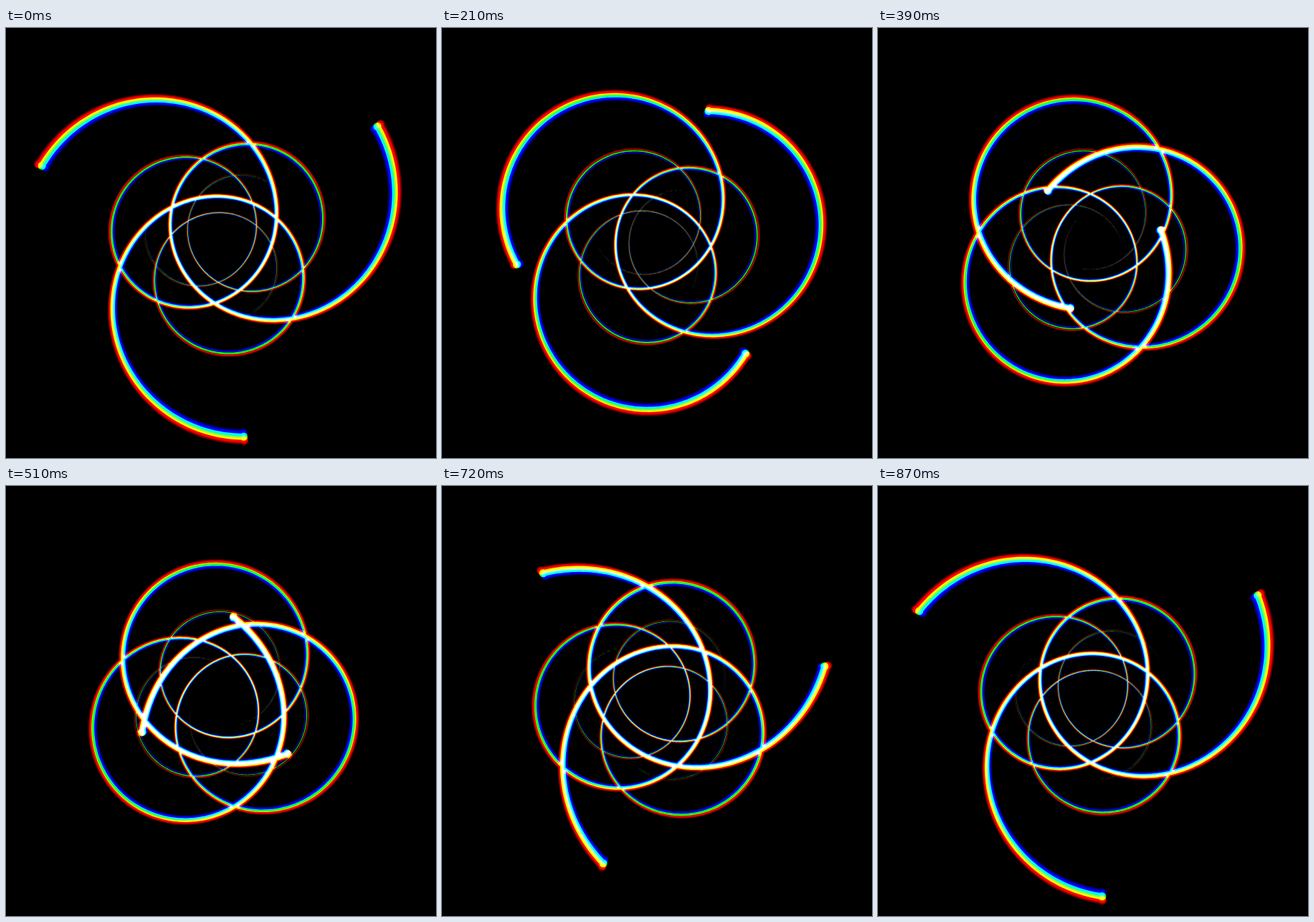
These frames come from a looping animation (600 px wide and 600 px high, 0.9 s). An HTML page with a canvas:

```html
<!DOCTYPE html>
<html lang="en">
<head>
<meta charset="utf-8">
<title>Triple spiral</title>
<style>
  html, body { margin: 0; width: 100%; height: 100%; overflow: hidden; background: #000; }
  canvas { display: block; width: 600px; height: 600px; }
</style>
</head>
<body>
<canvas id="stage" width="600" height="600"></canvas>
<script>
const ctx = document.getElementById('stage').getContext('2d');
const LOOP = 900, STEP = 30;
const TURNS = 2.03;       // trail length in coils
const SAMPLES = 480;
const ORBIT = 91, COIL = 182;
const DEPTH = 0.757;      // perspective falloff per coil
const WIDTH = 8.8, HEAD = 5.6;
const FRINGE = 0.018, BLUR = 0.007, PASSES = 5;
const rad = deg => deg * Math.PI / 180;

// Point on a trail, u coils behind its head.
function trailPoint(p, arm, u) {
  const s = 1 / (1 + DEPTH * u);
  const orbit = rad(210 + 120 * p + 120 * arm);
  const coil = rad(200 - 240 * p + 120 * arm + 360 * u);
  return {
    x: s * (ORBIT * Math.cos(orbit) + COIL * Math.cos(coil)),
    y: s * (ORBIT * Math.sin(orbit) + COIL * Math.sin(coil)),
    half: s * (1 - u / TURNS) * WIDTH / 2
  };
}

// Tapered ribbon with a round head.
function addTrail(path, p, arm) {
  const inner = [];
  for (let i = 0; i <= SAMPLES; i++) {
    const u = TURNS * i / SAMPLES;
    const a = trailPoint(p, arm, u);
    const b = trailPoint(p, arm, u + 0.001);
    const len = Math.hypot(b.x - a.x, b.y - a.y);
    const nx = (b.y - a.y) / len * a.half;
    const ny = (a.x - b.x) / len * a.half;
    if (i) path.lineTo(a.x + nx, a.y + ny);
    else path.moveTo(a.x + nx, a.y + ny);
    inner.push([a.x - nx, a.y - ny]);
  }
  inner.reverse().forEach(q => path.lineTo(q[0], q[1]));
  path.closePath();

  const head = trailPoint(p, arm, 0);
  path.moveTo(head.x + HEAD, head.y);
  path.arc(head.x, head.y, HEAD, 0, Math.PI * 2);
}

function fillScaled(path, scale, color) {
  ctx.setTransform(scale, 0, 0, scale, 300, 300);
  ctx.fillStyle = color;
  ctx.fill(path);
}

function draw(p) {
  const path = new Path2D();
  for (let arm = 0; arm < 3; arm++) addTrail(path, p, arm);

  ctx.setTransform(1, 0, 0, 1, 0, 0);
  ctx.globalCompositeOperation = 'source-over';
  ctx.fillStyle = '#000';
  ctx.fillRect(0, 0, 600, 600);

  // Red spreads outward and blue inward, both softened along the radius.
  ctx.globalCompositeOperation = 'lighter';
  fillScaled(path, 1, '#0f0');
  for (let i = 0; i < PASSES; i++) {
    const shift = FRINGE + BLUR * (2 * i / (PASSES - 1) - 1);
    fillScaled(path, 1 + shift, 'rgb(51,0,0)');
    fillScaled(path, 1 - shift, 'rgb(0,0,51)');
  }
}

const start = performance.now();
let shown = -1;
function tick() {
  const t = performance.now() - start;
  const step = Math.floor((t + 2) / STEP) % (LOOP / STEP);
  if (step !== shown) {
    shown = step;
    draw(step * STEP / LOOP);
  }
  requestAnimationFrame(tick);
}
tick();
</script>
</body>
</html>
```
